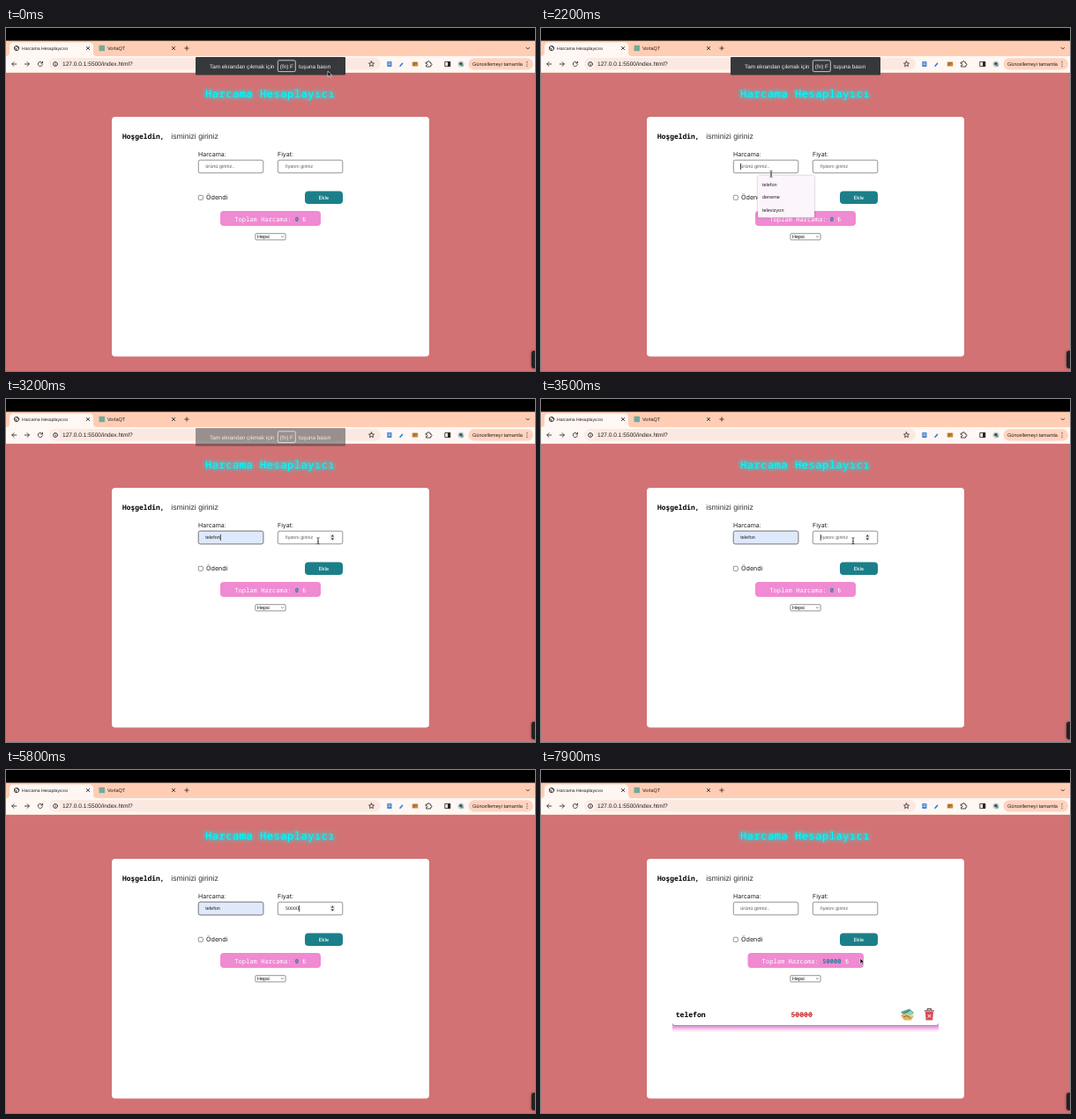
Animation, 600 px wide and 390 px high, one loop 8 s. Source, as an HTML page:

```html
<!DOCTYPE html>
<html lang="tr">
<head>
<meta charset="utf-8">
<title>Harcama Hesaplayıcısı</title>
<style>
html, body { margin: 0; width: 100%; height: 100%; overflow: hidden; background: #d27274; }
svg { display: block; width: 600px; height: 390px; }
text { font-family: "Liberation Sans", Arial, sans-serif; font-size: 5.5px; fill: #1f1f1f; text-rendering: geometricPrecision; white-space: pre; }
.mono { font-family: "Noto Sans Mono", "DejaVu Sans Mono", monospace; }
.label { font-family: Inter, sans-serif; font-size: 7px; }
.hint { fill: #5f5f5f; }
.line { fill: none; stroke: #3c3330; stroke-width: .9; stroke-linecap: round; stroke-linejoin: round; }
.box { fill: #fff; stroke: #777; stroke-width: .8; }
.title { font-size: 12px; font-weight: 500; letter-spacing: .55px; fill: #0ff; filter: drop-shadow(.5px .5px 1px #00cfe0) drop-shadow(0 0 2.5px #0ff); }
.total { font-size: 7.15px; fill: #fff; }
.sum { fill: #2d7f99; font-weight: 600; }
.bold { font-size: 8.1px; font-weight: 700; }
.toast text { font-size: 6.35px; fill: #f1f1f1; }
.menu rect.panel { filter: drop-shadow(0 .8px 1.2px #0005); }

/* one loop is 8 s, so 1.25% is a tenth of a second */
.early, .late, .filled, .hint2, .price, .spin, .menu, .hover, .caret, .arrow, .beam, .hand { animation: 8s step-end infinite; }
.early { animation-name: early; }
.late { animation-name: late; }
.filled { animation-name: filled; }
.hint1 { animation: empty 8s step-end infinite; }
.hint2 { animation-name: hint2; }
.price { animation-name: price; }
.spin { animation-name: spin; }
.menu { animation-name: menu; }
.hover { animation-name: hover; }
.caret { animation-name: caret; }
.arrow { animation-name: arrow; }
.beam { animation-name: beam; }
.hand { animation-name: hand; }
.toast { animation: toast 8s infinite; }
.pointer { animation: pointer 8s infinite; }

@keyframes early { 0% { opacity: 1 } 90%, 100% { opacity: 0 } }
@keyframes late { 0% { opacity: 0 } 90%, 100% { opacity: 1 } }
@keyframes filled { 0% { opacity: 0 } 28.75% { opacity: 1 } 90%, 100% { opacity: 0 } }
@keyframes empty { 0% { opacity: 1 } 28.75% { opacity: 0 } 90%, 100% { opacity: 1 } }
@keyframes hint2 { 0% { opacity: 1 } 56.25% { opacity: 0 } 90%, 100% { opacity: 1 } }
@keyframes spin { 0% { opacity: 0 } 37.5% { opacity: 1 } 87.5%, 100% { opacity: 0 } }
@keyframes menu { 0% { opacity: 0 } 13.75% { opacity: 1 } 36.25%, 100% { opacity: 0 } }
@keyframes hover { 0% { opacity: 0 } 28.75% { opacity: 1 } 36.25%, 100% { opacity: 0 } }
@keyframes price {
  0% { clip-path: inset(0 100% 0 0) }
  56.25% { clip-path: inset(0 80% 0 0) }
  63.75% { clip-path: inset(0 60% 0 0) }
  65% { clip-path: inset(0 40% 0 0) }
  68.75% { clip-path: inset(0 20% 0 0) }
  72.5% { clip-path: inset(0) }
  90%, 100% { clip-path: inset(0 100% 0 0) }
}
@keyframes caret {
  0% { opacity: 0; transform: translateX(226px) }
  12.5% { opacity: 1; transform: translateX(226px) }
  18.75% { opacity: 0; transform: translateX(226px) }
  23.75% { opacity: 1; transform: translateX(226px) }
  30% { opacity: 0; transform: translateX(226px) }
  32.5% { opacity: 1; transform: translateX(226px) }
  35% { opacity: 1; transform: translateX(242.8px) }
  42.5% { opacity: 1; transform: translateX(316.7px) }
  48.75% { opacity: 0; transform: translateX(316.7px) }
  55% { opacity: 1; transform: translateX(316.7px) }
  56.25% { opacity: 1; transform: translateX(320px) }
  63.75% { opacity: 1; transform: translateX(323px) }
  65% { opacity: 1; transform: translateX(326px) }
  68.75% { opacity: 1; transform: translateX(329px) }
  72.5% { opacity: 1; transform: translateX(332px) }
  78.75% { opacity: 0; transform: translateX(332px) }
  85% { opacity: 1; transform: translateX(332px) }
  87.5%, 100% { opacity: 0; transform: translateX(332px) }
}
@keyframes toast {
  0%, 36.25% { opacity: 1; animation-timing-function: steps(6) }
  43.75%, 100% { opacity: 0 }
}
@keyframes pointer {
  0% { transform: translate(365px, 49px); animation-timing-function: steps(4) }
  5% { transform: translate(318px, 104px); animation-timing-function: steps(5) }
  11.25%, 25% { transform: translate(261px, 161px); animation-timing-function: steps(6) }
  32.5%, 33.75% { transform: translate(261px, 175px); animation-timing-function: steps(5) }
  40%, 75% { transform: translate(354px, 161px); animation-timing-function: steps(5) }
  81.25% { transform: translate(391px, 210px); animation-timing-function: steps(4) }
  86.25%, 90% { transform: translate(369px, 196.5px); animation-timing-function: steps(7) }
  98.75%, 100% { transform: translate(362px, 214px) }
}
@keyframes arrow {
  0% { opacity: 1 } 10% { opacity: 0 } 28.75% { opacity: 1 } 37.5% { opacity: 0 }
  78.75% { opacity: 1 } 82.5% { opacity: 0 } 92.5%, 100% { opacity: 1 }
}
@keyframes beam {
  0% { opacity: 0 } 10% { opacity: 1 } 28.75% { opacity: 0 } 37.5% { opacity: 1 }
  56.25% { opacity: 0 } 76.25% { opacity: 1 } 78.75%, 100% { opacity: 0 }
}
@keyframes hand { 0% { opacity: 0 } 82.5% { opacity: 1 } 92.5%, 100% { opacity: 0 } }
</style>
</head>
<body>
<svg viewBox="0 0 600 390">
  <defs>
    <linearGradient id="glow" x2="0" y2="1">
      <stop stop-color="#e07cc8"/>
      <stop offset=".45" stop-color="#f0a8de"/>
      <stop offset="1" stop-color="#fbe0f5" stop-opacity="0"/>
    </linearGradient>
    <path id="x" class="line" d="M-1.7-1.7 1.7 1.7M1.7-1.7-1.7 1.7"/>
  </defs>

  <!-- browser -->
  <rect width="600" height="390" fill="#d27274"/>
  <rect width="600" height="51" fill="#ffcdb4"/>
  <rect width="600" height="14.5" fill="#000"/>
  <path d="M0 32Q4 32 4 28V21Q4 16.500 8.500 16.500H94.500Q99 16.500 99 21V28Q99 32 103 32H600V50.500H0Z" fill="#fff7f3"/>
  <g class="line">
    <circle cx="12" cy="23" r="2.700"/>
    <path d="M9.500 22.500 12 23.500 11.500 25.500M12 20.500 13 22H14.500"/>
    <path d="M205 20.800V25.200M202.800 23H207.200"/>
    <path d="M590 22.200 591.800 24 593.600 22.200"/>
    <path d="M11.800 41H6.800M9 38.700 6.700 41 9 43.300M21.300 41H26.300M24.100 38.700 26.400 41 24.100 43.300"/>
    <path d="M41.200 39.700A2.600 2.600 0 1 0 41.400 41.700M41.500 38.200V40H39.700"/>
  </g>
  <use href="#x" x="93" y="23"/>
  <use href="#x" x="190" y="23"/>
  <rect x="105.500" y="19.700" width="6.500" height="6.500" fill="#74a99b"/>
  <text x="18" y="24.900" style="font-size:5.050px">Harcama Hesaplayıcısı</text>
  <text x="115" y="24.900" style="font-size:5.500px">VorlaQT</text>

  <rect x="49" y="34" width="376" height="13.500" rx="6.700" fill="#fbe9e1"/>
  <circle cx="56" cy="41" r="4.800" fill="#fff7f3"/>
  <g class="line">
    <circle cx="56" cy="41" r="2.500"/>
    <path d="M56 41V42.200M56 39.700V39.800"/>
    <path d="M414.500 37.900 415.400 39.900 417.500 40.100 415.900 41.500 416.400 43.600 414.500 42.500 412.600 43.600 413.100 41.500 411.500 40.100 413.600 39.900Z"/>
    <path d="M476.500 39H478.200Q478.200 37.500 479.300 37.500T480.400 39H481.700V40.400Q483 40.400 483 41.500T481.700 42.600V44H476.500V42.500Q478 42.500 478 41.500T476.500 40.500Z"/>
    <rect x="498.200" y="38.400" width="5.600" height="5.200"/>
  </g>
  <text x="64" y="43.300" style="font-size:6.600px">127.0.0.1:5500/index.html?</text>
  <rect x="432.300" y="38" width="5.200" height="6" rx=".6" fill="#4b86d1"/>
  <path d="M433.500 39.800H436.300M433.500 41.500H436.300" stroke="#fff" stroke-width=".6"/>
  <path d="M447 43.200 449.600 40.200" stroke="#2678d8" stroke-width="1.500" stroke-linecap="round"/>
  <rect x="460.700" y="38.400" width="6.600" height="5.200" rx=".7" fill="#c78a3d"/>
  <path d="M462 40H466M462 42H464" stroke="#70491f" stroke-width=".7"/>
  <rect x="501" y="38.200" width="3" height="5.600" fill="#2b2523"/>
  <circle cx="516" cy="41" r="3.600" fill="#c8d3d2"/>
  <path d="M513.500 41Q516 37 518 40.500L516.500 43Z" fill="#46545a"/>
  <circle cx="517.500" cy="42.500" r="1.200" fill="#4fa38d"/>
  <rect x="524.500" y="34.200" width="73.500" height="13.300" rx="6.600" fill="#ffd3bf"/>
  <text x="529" y="43" style="font-size:5.600px">Güncellemeyi tamamla</text>
  <path d="M591 38.700V38.710M591 41V41.010M591 43.300V43.310" class="line" style="stroke-width:1.200"/>

  <!-- page -->
  <text class="mono title" x="226" y="78.700">Harcama Hesaplayıcı</text>
  <rect x="120" y="101" width="360" height="272.500" rx="4" fill="#fff"/>
  <text class="mono bold" x="132" y="126" style="font-size:7.900px;fill:#000">Hoşgeldin,</text>
  <text x="187.300" y="125.700" style="font-size:8.700px;fill:#333">isminizi giriniz</text>
  <text class="label" x="218" y="146">Harcama:</text>
  <text class="label" x="308" y="146">Fiyat:</text>
  <rect class="box" x="218.300" y="150.200" width="73.500" height="14.600" rx="2"/>
  <rect class="box" x="308.300" y="150.200" width="73.500" height="14.600" rx="2"/>
  <rect class="box filled" x="218.300" y="150.200" width="73.500" height="14.600" rx="2" style="fill:#dfe9fc"/>
  <text class="hint hint1" x="226.300" y="159.300">ürünü giriniz..</text>
  <text class="filled" x="226.300" y="159.300">telefon</text>
  <text class="hint hint2" x="317" y="159.300" style="font-size:5.350px">fiyatını giriniz</text>
  <text class="price" x="317" y="159.300" style="font-size:5.400px">50000</text>
  <g class="spin">
    <rect x="367.300" y="153.300" width="6" height="8" rx="1.500" fill="#eee"/>
    <path d="M368.600 156.600 370.300 154.300 372 156.600ZM368.600 158.200 370.300 160.500 372 158.200Z" fill="#333"/>
  </g>
  <rect class="caret" y="154" width=".7" height="7" fill="#000"/>

  <rect class="box" x="218.300" y="190.300" width="5" height="5" rx=".9"/>
  <text class="label" x="227" y="195.300" style="font-size:7.200px">Ödendi</text>
  <rect x="339" y="185.500" width="43" height="14.500" rx="4" fill="#1b7f89"/>
  <text class="label" x="360.500" y="194.800" text-anchor="middle" style="font-size:5.700px;font-weight:500;fill:#fff">Ekle</text>

  <g class="early">
    <rect x="243" y="208" width="114" height="17" rx="4" fill="#f08ad2"/>
    <text class="mono total" x="259.200" y="219.600">Toplam Harcama: <tspan class="sum">0</tspan> ₺</text>
  </g>
  <g class="late">
    <rect x="234.500" y="208" width="131.500" height="17" rx="4" fill="#f08ad2"/>
    <text class="mono total" x="250.600" y="219.600">Toplam Harcama: <tspan class="sum">50000</tspan> ₺</text>
  </g>

  <rect class="box" x="282.900" y="233.700" width="34.200" height="7.200" rx="1"/>
  <text x="285" y="239.200" style="font-size:5.400px;fill:#000">Hepsi</text>
  <path class="line" d="M312.300 236.700 313.500 237.900 314.700 236.700" style="stroke-width:.6"/>

  <!-- expense row -->
  <g class="late">
    <path d="M149 288H451V294Q451 299 447 299H153Q149 299 149 294Z" fill="url(#glow)"/>
    <path d="M149 287H451Q451 291.300 447 291.300H153Q149 291.300 149 287Z" fill="#6fa9cf"/>
    <rect x="149" y="266" width="302" height="24" rx="3.500" fill="#fff"/>
    <text class="mono bold" x="152.700" y="281" style="fill:#000">telefon</text>
    <text class="mono bold" x="283.500" y="281" style="fill:#cf3a3a">50000</text>
    <path d="M283.500 278.300H308" stroke="#cf3a3a" stroke-width=".8"/>
    <path d="M408 275 418 271.500 423 276 412 280Z" fill="#4fa79d"/>
    <path d="M409.500 278 419 273.500 423 277.500 413 282Z" fill="#9fd0b8"/>
    <path d="M408 279 412 277 417 280 423 279 420 284.500H412Z" fill="#e2b45c"/>
    <path d="M411 281 415 279.500 419 282M412 276.500 418 274" stroke="#5d4a35" stroke-width=".7" fill="none"/>
    <path d="M435.800 275H445L444.200 284.500H436.600Z" fill="#d94b5a"/>
    <path d="M434.800 273.800H446M438.400 273V271.700H442.400V273" fill="none" stroke="#7a4a50" stroke-width="1.300"/>
    <path d="M438.700 278 442.100 281.500M442.100 278 438.700 281.500" stroke="#fff" stroke-width="1"/>
  </g>

  <!-- suggestions -->
  <g class="menu">
    <rect class="panel" x="246" y="168" width="64" height="47.500" rx="1.500" fill="#fcf5fc"/>
    <rect class="hover" x="246" y="170.700" width="64" height="14.300" fill="#f1e2e6"/>
    <text x="251" y="179.700">telefon</text>
    <text x="251" y="194.300">deneme</text>
    <text x="251" y="209">televizyon</text>
  </g>

  <g class="toast">
    <rect x="215" y="33" width="170" height="20.500" rx="1" fill="#37383b"/>
    <rect x="308.300" y="36.800" width="20" height="12.800" rx="1.500" fill="none" stroke="#e8e8e8" stroke-width=".8"/>
    <text x="231" y="45.500">Tam ekrandan çıkmak için</text>
    <text x="310.800" y="45.500">(fn) F</text>
    <text x="332" y="45.500">tuşuna basın</text>
  </g>

  <path d="M600 367H599Q596 367 596 370V384Q596 387 599 387H600Z" fill="#222" style="filter:drop-shadow(0 0 1.500px #0008)"/>

  <g class="pointer">
    <path class="arrow" d="M0 0V6.300L1.500 5 2.600 7.300 3.700 6.800 2.600 4.600H4.600Z" fill="#000" stroke="#fff" stroke-width=".6"/>
    <path class="beam" d="M-1.500-3.300Q0-3.300 0-2.300Q0-3.300 1.500-3.300M0-2.300V2.800M-1.500 3.800Q0 3.800 0 2.800Q0 3.800 1.500 3.800M-.8.900H.8" fill="none" stroke="#222" stroke-width=".8"/>
    <path class="hand" d="M-.8.500Q0-.5.700.500V3L3.200 3.500Q4 3.800 3.800 5L3 7H-.3L-2.500 4.300Q-2.300 3.300-.8 4.300Z" fill="#fff" stroke="#111" stroke-width=".7"/>
  </g>
</svg>
</body>
</html>
```
